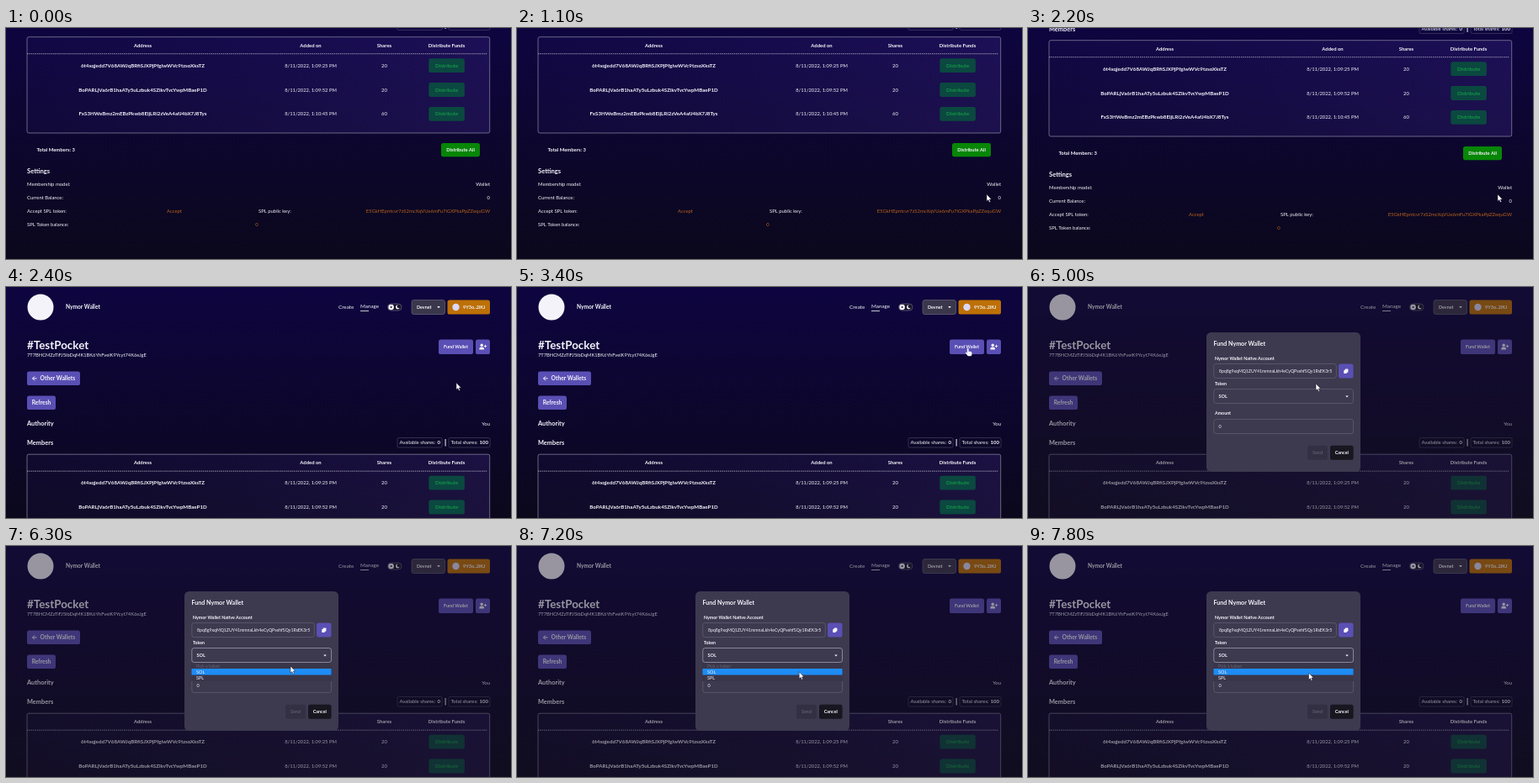
An HTML page with a canvas that plays this animation: 600 by 275 pixels, repeating every 8 s.

```html
<!DOCTYPE html>
<html lang="en">
<head>
<meta charset="utf-8">
<title>Wallet funding</title>
<style>
html, body { margin: 0; width: 100%; height: 100%; overflow: hidden; background: #0d0630; }
canvas { display: block; width: 600px; height: 275px; }
</style>
</head>
<body>
<canvas id="stage"></canvas>
<script>
const W = 600, H = 275, LOOP = 8000, STEP = 100;
const canvas = document.getElementById('stage');
const ctx = canvas.getContext('2d');
const dpr = window.devicePixelRatio || 1;
canvas.width = W * dpr;
canvas.height = H * dpr;

const WHITE = '#f4f3fa', ORANGE = '#b8601c', VIOLET = '#5a4fb4';
const BRAND = 'Nymor Wallet';
const ROWS = [
  ['6t4xqjedd7V68AWJqBRfiSJXPjPfgiwWVc9tzsoXksTZ', '8/11/2022, 1:09:25 PM', '20'],
  ['BoPARLjVa6rB1haATy5uLzbuk4SZikvTvcYwpMBaeP1D', '8/11/2022, 1:09:52 PM', '20'],
  ['FxS3HWeBmz2mEBzPkwb8EijLRi2zVeA4afJ4bX7J8Tys', '8/11/2022, 1:10:45 PM', '60']
];

// Key times with values; linear in between.
const SCROLL = [[2100, 188.5], [2200, 184.5], [2300, 96], [2400, 0]];
const POINTER = [
  [400, 574, 214], [600, 572, 210], [800, 570, 207], [1100, 558, 198], [2200, 558, 198],
  [2400, 535, 114], [2800, 537, 96], [3000, 537, 94], [3600, 534, 64], [3900, 534, 64],
  [4500, 342, 115], [5000, 342, 115], [5700, 339, 133], [6000, 338, 134],
  [6300, 338, 143], [6800, 336, 149], [7000, 336, 149], [7500, 334, 151], [7800, 333.5, 151]
];

function track(keys, t) {
  if (t <= keys[0][0]) return keys[0].slice(1);
  for (let i = 1; i < keys.length; i++) {
    const a = keys[i - 1], b = keys[i];
    if (t <= b[0]) {
      const p = (t - a[0]) / (b[0] - a[0]);
      return a.slice(1).map((v, k) => v + (b[k + 1] - v) * p);
    }
  }
  return keys[keys.length - 1].slice(1);
}

function text(str, x, y, size = 5.9, { color = WHITE, bold = false, align = 'left' } = {}) {
  ctx.font = `${bold ? 700 : 400} ${size}px Lato, "Open Sans", sans-serif`;
  ctx.fillStyle = color;
  ctx.textAlign = align;
  ctx.textBaseline = 'alphabetic';
  ctx.fillText(str, x, y + size * 0.35);
}

function box(x, y, w, h, r, fill, stroke, line = 0.7) {
  ctx.beginPath();
  ctx.roundRect(x, y, w, h, r);
  if (fill) { ctx.fillStyle = fill; ctx.fill(); }
  if (stroke) { ctx.strokeStyle = stroke; ctx.lineWidth = line; ctx.stroke(); }
}

function disc(x, y, r, fill) {
  ctx.beginPath();
  ctx.arc(x, y, r, 0, Math.PI * 2);
  ctx.fillStyle = fill;
  ctx.fill();
}

function poly(points, fill) {
  ctx.beginPath();
  points.forEach(([x, y]) => ctx.lineTo(x, y));
  ctx.closePath();
  ctx.fillStyle = fill;
  ctx.fill();
}

function caret(x, y, color = WHITE) {
  poly([[x - 1.8, y - 0.9], [x + 1.8, y - 0.9], [x, y + 1.2]], color);
}

function button(label, x, y, w, h, fill, size, color = WHITE, bold = true) {
  box(x, y, w, h, 2.6, fill);
  text(label, x + w / 2, y + h / 2, size, { bold, color, align: 'center' });
}

// Fixed to the viewport, so it does not scroll.
function background() {
  const g = ctx.createLinearGradient(0, 0, 0, H);
  g.addColorStop(0, '#0e0540');
  g.addColorStop(1, '#0b081c');
  ctx.fillStyle = g;
  ctx.fillRect(0, 0, W, H);
}

function header() {
  disc(41, 24, 15.5, WHITE);
  text(BRAND, 71, 24, 6.6, { bold: true });
  text('Create', 395, 23.5, 6.3);
  text('Manage', 421, 22.5, 6.3);
  ctx.fillStyle = WHITE;
  ctx.fillRect(421, 28, 10, 0.8);

  box(453.5, 20, 16.5, 8, 4, '#15122a', '#8f8ca4', 0.5);
  disc(457.6, 24, 3.3, WHITE);
  disc(457.6, 24, 1, '#15122a');
  disc(465.3, 24, 2.4, WHITE);
  disc(466.5, 23.2, 1.9, '#15122a');

  box(482, 15.5, 39.5, 17, 2.6, '#3a364b', '#6a667a');
  text('Devnet', 488, 24, 5.4, { bold: true });
  caret(514, 24);

  box(524.5, 15.5, 50.5, 17, 2.6, '#bd7006');
  disc(534.5, 24, 4.2, '#dcd8f6');
  text('9Y3o..2iKJ', 543, 24, 5.5, { bold: true });
}

function walletTop() {
  text('#TestPocket', 25, 69.5, 13.4, { bold: true });
  text('7T7BHCMZzTiFJ5ibDqMK1BK6YhFveiK9Ycyt74K6eJgE', 25, 81, 5.75);
  button('Fund Wallet', 514, 62.5, 41, 17.5, VIOLET, 5.4);
  box(558, 62.5, 17, 17.5, 2.6, VIOLET);
  disc(565.2, 69.3, 1.7, WHITE);
  box(562.3, 71.6, 5.8, 3, [2.4, 2.4, 0.4, 0.4], WHITE);
  ctx.fillStyle = WHITE;
  ctx.fillRect(567.8, 70, 3.4, 0.9);
  ctx.fillRect(569.05, 68.75, 0.9, 3.4);

  box(25, 100.5, 63, 16.5, 2.6, VIOLET);
  ctx.beginPath();
  ctx.moveTo(34, 106.4); ctx.lineTo(31.5, 108.9); ctx.lineTo(34, 111.4);
  ctx.moveTo(31.5, 108.9); ctx.lineTo(36.5, 108.9);
  ctx.strokeStyle = WHITE;
  ctx.lineWidth = 1;
  ctx.stroke();
  text('Other Wallets', 40.5, 109, 6.7, { bold: true });
  button('Refresh', 25, 129.5, 34, 16.5, VIOLET, 6.7);

  text('Authority', 25, 162.5, 7.4, { bold: true });
  text('You', 575, 163, 6, { align: 'right' });
}

function shareBox(label, value, x, w) {
  box(x, 179.5, w, 11.5, 1.5, null, '#4d4a68', 0.6);
  text(label, x + 2.5, 185.3, 5.9);
  text(value, x + w - 2, 185.3, 6, { bold: true, align: 'right' });
}

function table() {
  const bold = true, align = 'center';
  text('Members', 25, 185.5, 7.4, { bold });
  shareBox('Available shares:', '0', 465, 53);
  shareBox('Total shares:', '100', 526, 49);
  ctx.fillStyle = WHITE;
  ctx.fillRect(521.6, 181, 1, 8.5);

  const g = ctx.createLinearGradient(25, 199, 575, 313);
  g.addColorStop(0, 'rgba(60,40,150,0.08)');
  g.addColorStop(1, 'rgba(90,60,190,0.2)');
  box(25, 199.2, 549.7, 114.3, 2, g, '#908da6', 0.7);
  const cols = [162.5, 362, 449.5, 523.5];
  ['Address', 'Added on', 'Shares', 'Distribute Funds'].forEach((h, i) =>
    text(h, cols[i], 209.2, 5.9, { bold, align }));
  ctx.setLineDash([1.4, 1]);
  ctx.beginPath();
  ctx.moveTo(25, 219.2);
  ctx.lineTo(572, 219.2);
  ctx.strokeStyle = '#c4c1d4';
  ctx.lineWidth = 0.8;
  ctx.stroke();
  ctx.setLineDash([]);

  ROWS.forEach(([key, date, shares], i) => {
    const y = 233.2 + i * 28.8;
    text(key, cols[0], y, 6.2, { bold, align });
    text(date, cols[1], y, 5.8, { align });
    text(shares, cols[2], y, 5.9, { align });
    button('Distribute', 502.3, y - 8.4, 42.6, 16.8, '#0b4840', 6.2, '#18ac48', false);
  });
  text('Total Members: 3', 36.5, 333.2, 5.9, { bold });
  button('Distribute All', 517, 325.5, 46, 16.2, '#078607', 5.7);
}

function settings() {
  const right = { align: 'right' };
  text('Settings', 25, 358.5, 7.6, { bold: true });
  text('Membership model:', 25, 374.5);
  text('Wallet', 575, 374.5, 5.9, right);
  text('Current Balance:', 25, 390.3);
  text('0', 575, 390.3, 5.9, right);
  text('Accept SPL token:', 25, 406.5);
  text('Accept', 191, 406.5, 5.9, { color: ORANGE });
  text('SPL public key:', 300, 406.5);
  text('E5GkHEpntcvr7zS2mcXqVUe6mFu7iGXPkaPpZZequGW', 575, 406.5, 5.9, { color: ORANGE, align: 'right' });
  text('SPL Token balance:', 25, 422.3);
  text('0', 296.3, 422.3, 5.9, { color: ORANGE });
}

function dropdown() {
  box(220, 139, 167, 22, 0, '#3a364a');
  text('Pick a token', 226, 142.8, 5.3, { color: '#66627a' });
  ctx.fillStyle = '#1e8cf5';
  ctx.fillRect(220.5, 146, 166, 7.5);
  text('SOL', 226, 149.9, 5.5);
  text('SPL', 226, 157.2, 5.5);
}

function modal(opening, listOpen) {
  const line = '#666178', bold = true;
  ctx.save();
  if (opening) {
    ctx.globalAlpha = 0.42;
    ctx.translate(303.5, 137);
    ctx.scale(0.962, 0.962);
    ctx.translate(-303.5, -137);
  }
  box(212, 54, 183, 166, 5.5, '#3d394f');
  text('Fund ' + BRAND, 220.5, 68, 7.1, { bold });
  text(BRAND + ' Native Account', 222, 85, 5.3, { bold });
  box(220.8, 91.5, 145.5, 17, 2.6, null, line);
  text('8pq8g9xqMQ1ZUY41mmnaLkh4eCyQPsehfSQy1RsEK3r5', 227, 100, 5.2);
  box(369, 91.5, 17.5, 17, 2.6, VIOLET);
  box(376.6, 97.4, 3.8, 4.4, 0.8, WHITE);
  box(375.2, 99, 3.6, 4, 0.8, WHITE);

  text('Token', 222, 114.8, 5.3, { bold });
  box(220.8, 121.5, 165.7, 17, 2.6, null, listOpen ? '#aaa6ba' : line);
  text('SOL', 226.5, 130, 5.5, { bold });
  caret(379, 130.3);

  if (!listOpen) text('Amount', 222, 150.5, 5.3, { bold });
  box(220.8, 157.5, 165.7, 17, 2.6, null, line);
  text('0', 226.5, 166, 5.5);
  button('Send', 332, 188.8, 24, 17, '#343044', 5.4, '#5f5b6e');
  button('Cancel', 359, 188.8, 27.6, 17, '#18161f', 5.4);
  if (listOpen) dropdown();
  ctx.restore();
}

function pointer(x, y, hand) {
  ctx.save();
  ctx.translate(x, y);
  if (hand) {
    box(-0.2, -1, 1.8, 7, 0.9, WHITE);
    box(-0.2, 2.8, 5.6, 5.4, 1.6, WHITE);
    poly([[-0.2, 7], [-2.2, 4.2], [-1.2, 3.6], [0.6, 5.4]], WHITE);
  } else {
    const shape = [[0, 0], [0, 8.2], [1.9, 6.6], [3.1, 9.4], [4.5, 8.8], [3.3, 6.1], [5.7, 5.9]];
    poly(shape, '#ffffff');
    ctx.strokeStyle = '#15122a';
    ctx.lineWidth = 0.5;
    ctx.stroke();
  }
  ctx.restore();
}

function draw(time) {
  const t = Math.floor((time % LOOP) / STEP) * STEP;
  const [s] = track(SCROLL, t);
  ctx.setTransform(dpr, 0, 0, dpr, 0, 0);
  background();
  ctx.save();
  ctx.translate(0, -s);
  header();
  walletTop();
  table();
  settings();
  ctx.restore();

  if (t >= 3800) {
    const opening = t < 3900;
    ctx.fillStyle = `rgba(24,21,36,${opening ? 0.16 : 0.42})`;
    ctx.fillRect(0, 0, W, H);
    modal(opening, t >= 6300);
  }
  if (t >= 400) {
    const [x, y] = track(POINTER, t);
    pointer(x, y, t >= 3300 && t < 4000);
  }
}

const start = performance.now();
function tick() {
  draw(performance.now() - start);
  requestAnimationFrame(tick);
}
tick();
</script>
</body>
</html>
```
